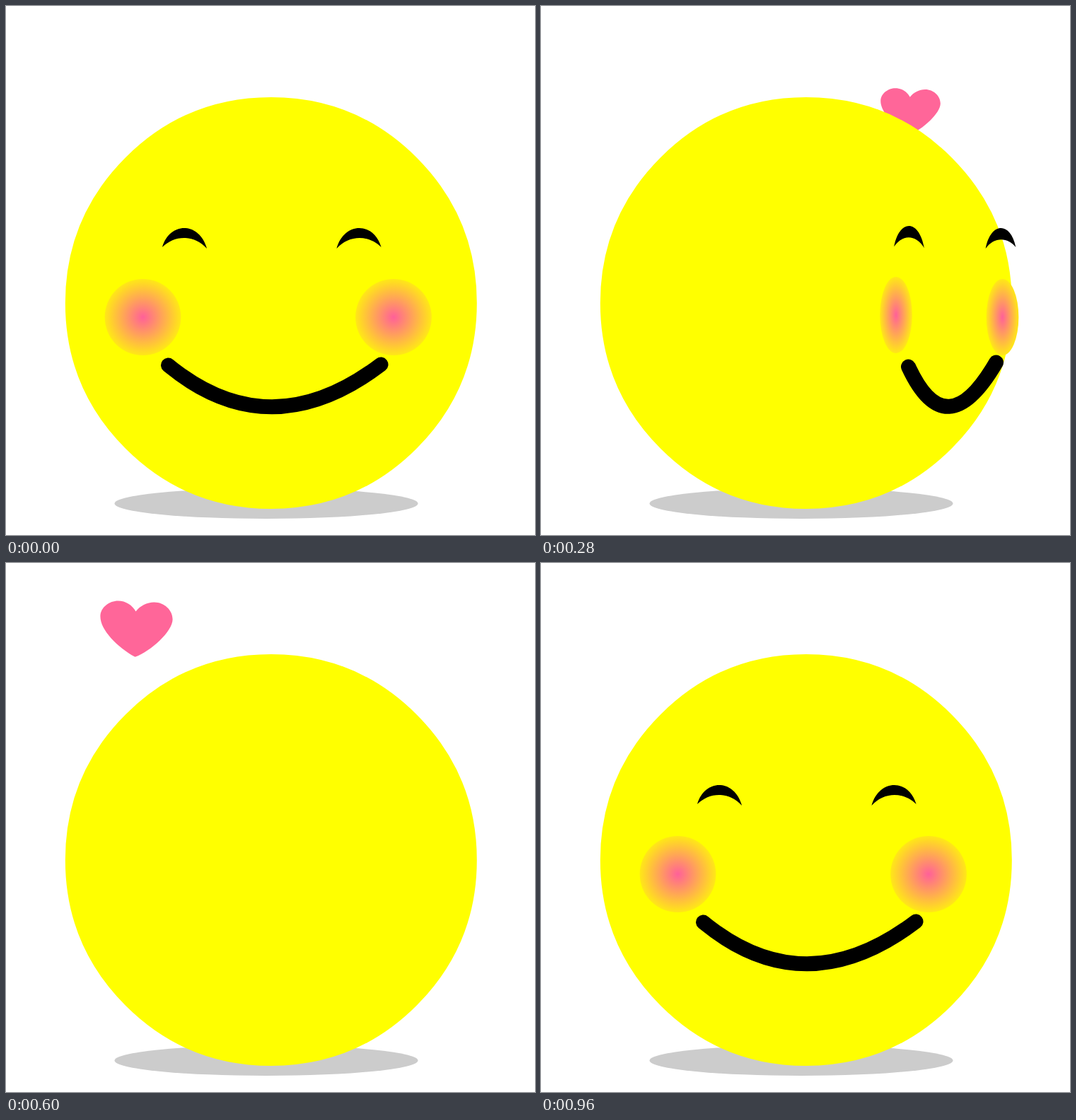
These frames come from a looping animation (748 by 748 pixels, 1 s). An HTML page:

```html
<!DOCTYPE html>
<html lang="en">
<head>
<meta charset="utf-8">
<title>Turning smiley</title>
<style>
  html, body { margin: 0; width: 100%; height: 100%; overflow: hidden; background: #fff; }
  svg { display: block; width: 100%; height: 100%; }
</style>
</head>
<body>
<svg viewBox="0 0 748 748">
  <defs>
    <radialGradient id="blush">
      <stop offset="0" stop-color="#ff6099"/>
      <stop offset="1" stop-color="#ffe816"/>
    </radialGradient>
  </defs>
  <ellipse cx="368" cy="703.5" rx="214.5" ry="21.5" fill="#ccc"/>
  <g id="hearts" fill="#f69"></g>
  <path id="ball" fill="#ff0"/>
  <g id="face">
    <ellipse id="cheek0" ry="54" fill="url(#blush)"/>
    <ellipse id="cheek1" ry="54" fill="url(#blush)"/>
    <path id="eye0"/>
    <path id="eye1"/>
    <path id="mouth" fill="none" stroke="#000" stroke-width="21" stroke-linecap="round"/>
  </g>
</svg>
<script>
const LOOP = 1000, STEP = 40;
const $ = id => document.getElementById(id);
const set = (el, attrs) => {
  for (const name in attrs) el.setAttribute(name, attrs[name]);
};

// eyes, cheeks: centre x of left and right; rise: upward shift of left and right;
// mouth: x, y of one end, x of the bend, x, y of the other end
const front = {
  eyes: [252.5, 499], cheeks: [193.5, 548], rise: [0, 0], mouth: [229.5, 508, 373, 530, 507]
};
const turned = {
  eyes: [396, 597], cheeks: [355, 616], rise: [0, 0], mouth: [380.5, 508, 487, 602, 506.5]
};
const rightEdge = {
  eyes: [520.5, 650], cheeks: [502, 652.5], rise: [3, 0], mouth: [519.5, 510, 573, 643.5, 504]
};
const leftEdge = {
  eyes: [126, 204], cheeks: [104.5, 236], rise: [3, 8], mouth: [123, 495, 175, 218, 500]
};

const mix = (a, b, k) => a.map((v, i) => v + (b[i] - v) * k);
const blend = (a, b, k) =>
  Object.fromEntries(Object.keys(a).map(key => [key, mix(a[key], b[key], k)]));

// the face leaves over the right edge and comes back over the left one
function poseAt(t) {
  if (t < 200) return blend(front, turned, t / 200);
  if (t < 340) return blend(turned, rightEdge, Math.min((t - 200) / 80, 1.3));
  if (t < 720) return null;
  return blend(leftEdge, front, Math.max(-0.1, Math.min((t - 760) / 200, 1)));
}

function eyePath(x, w, rise, side) {
  const tips = side ? [343, 341] : [341, 343];
  const [y1, y2] = tips.map(y => y - rise / 4);
  // control height that lets the cubic peak at the given y
  const lift = peak => (peak - (y1 + y2) / 8) / 0.75;
  const top = 314 - rise;
  const a = lift(top), b = lift(top + 21.5 - w * 0.12);
  const l = x - w / 2, r = x + w / 2;
  return `M${l} ${y1}C${l + w * 0.17} ${a} ${r - w * 0.17} ${a} ${r} ${y2}` +
    `C${r - w * 0.28} ${b} ${l + w * 0.28} ${b} ${l} ${y1}Z`;
}

function drawFace(t) {
  const pose = poseAt(t);
  set($("face"), { visibility: pose ? "visible" : "hidden" });
  if (!pose) return;
  const { eyes, cheeks, rise, mouth } = pose;
  // features narrow as the two sides draw together
  const eyeWidth = 20 + 0.175 * (eyes[1] - eyes[0]);
  const cheekRadius = 0.152 * (cheeks[1] - cheeks[0]);
  for (const side of [0, 1]) {
    set($("cheek" + side), { cx: cheeks[side], cy: 440 - rise[side], rx: cheekRadius });
    set($("eye" + side), { d: eyePath(eyes[side], eyeWidth, rise[side], side) });
  }
  const [x1, y1, bend, x2, y2] = mouth;
  set($("mouth"), { d: `M${x1} ${y1}Q${bend} ${(y1 + y2) / 2 + 118.5} ${x2} ${y2}` });
}

// eight quadratic arcs make the slightly bulging ball
function ballPath(cx, cy, r) {
  const arc = Math.PI / 4;
  const at = (turn, radius) =>
    `${cx + radius * Math.cos(turn * arc)} ${cy + radius * Math.sin(turn * arc)}`;
  let d = "M" + at(0, r);
  for (let i = 1; i <= 8; i++) d += `Q${at(i - 0.5, r / Math.cos(arc / 2))} ${at(i, r)}`;
  return d + "Z";
}

// leave: time when the tip passes the upper edge; speed in px per ms
const hearts = [
  { right: false, leave: 263, speed: 1.085 },
  { right: true, leave: 499, speed: 0.83 },
  { right: false, leave: 777, speed: 0.75 },
  { right: true, leave: 957, speed: 0.86 }
];
const HEART_WIDTH = 102;
const HEART = "M0 0C-25-14-49-38-49-57C-49-70-36-79-24-79C-13-79-4-73 1-64" +
  "C7-72 17-77 27-77C41-77 53-66 53-53C53-36 22-8 0 0Z";

for (const heart of hearts) {
  heart.path = document.createElementNS("http://www.w3.org/2000/svg", "path");
  set(heart.path, { d: HEART });
  $("hearts").append(heart.path);
}

// hearts grow as they rise from behind the ball
function drawHearts(t) {
  for (const { path, right, leave, speed } of hearts) {
    const y = (leave - t) * speed;
    const x = right ? 564.5 - 0.24 * y : 182.5;
    set(path, {
      visibility: y > 0 && y < 300 ? "visible" : "hidden",
      transform: `translate(${x} ${y}) scale(${(150 - 0.36 * y) / HEART_WIDTH})`
    });
  }
}

function render(ms) {
  const t = Math.floor((ms % LOOP) / STEP) * STEP;
  drawFace(t);
  drawHearts(t);
}

set($("ball"), { d: ballPath(374.8, 420, 291) });
const start = performance.now();
function tick() {
  render(performance.now() - start);
  requestAnimationFrame(tick);
}
tick();
</script>
</body>
</html>
```
